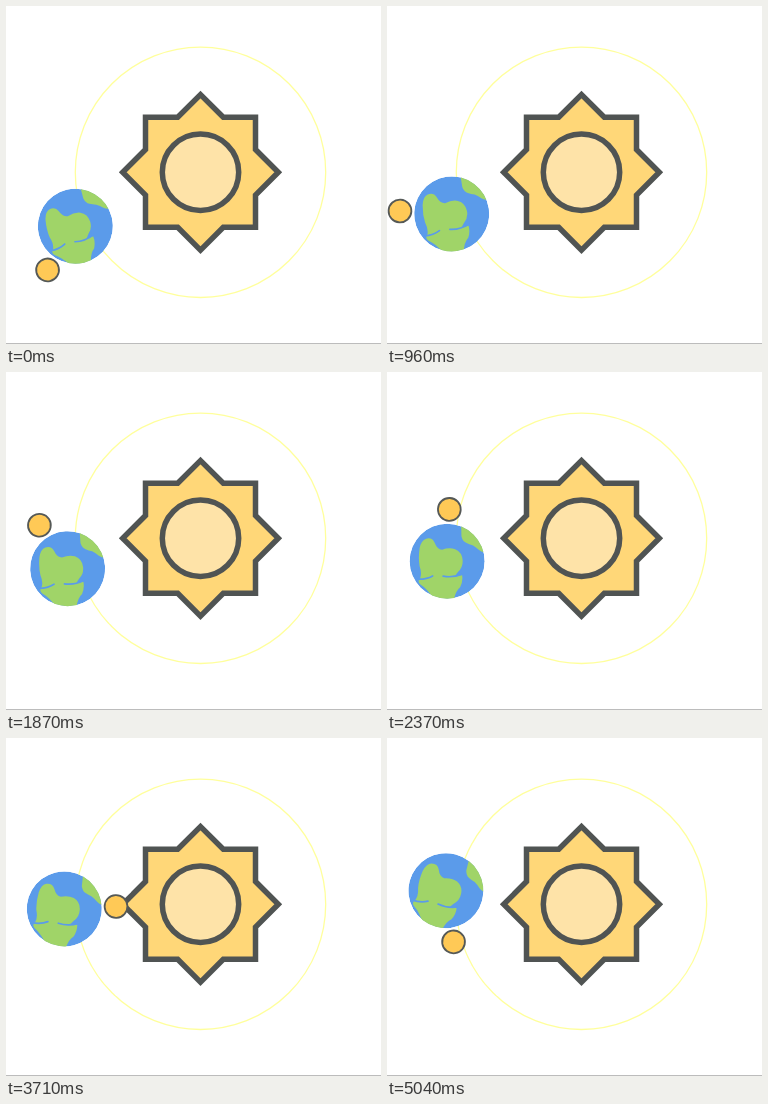
These frames come from a looping animation (375x338 px, 5100 ms). An HTML page:

```html
<!DOCTYPE html>
<html lang="en">
<head>
<meta charset="utf-8">
<title>Sun, earth and moon</title>
<style>
  html, body { margin: 0; width: 100%; height: 100%; overflow: hidden; background: #fff; }
  svg { display: block; width: 375px; height: 338px; }
  .ink { stroke: #505453; stroke-width: 5.5; }
  .sea { fill: #5b9bea; }
  .land { fill: #a0d468; }
  .river { fill: none; stroke: #5b9bea; stroke-width: 1.7; stroke-linecap: round; }
</style>
</head>
<body>
<svg viewBox="0 0 375 338">
  <defs>
    <clipPath id="globe"><circle r="37.5"/></clipPath>
  </defs>
  <rect y="337" width="375" height="1" fill="#bcbcbc"/>
  <g transform="translate(194.5 166.3)">
    <circle r="125.2" fill="none" stroke="#ffff9c" stroke-width="1.3"/>
    <path id="star" class="ink" fill="#ffd778"/>
    <circle class="ink" r="38.2" fill="#fee3a8"/>
    <g id="orbit">
      <g transform="translate(-136.3 0)">
        <g transform="rotate(9.65)" clip-path="url(#globe)">
          <circle class="sea" r="37.5"/>
          <path class="land" d="M14 -40 L14.3 -25 Q15.5 -20 19 -18.5 Q22 -17 25.5 -16 Q29 -14 31.6 -11.4 Q34 -9 40 -8.5 L40 -40Z"/>
          <path class="land" d="M-27 17 Q-25 12 -27.5 5 Q-29 -3 -27.5 -13 Q-26 -21 -21 -22.5 Q-15 -24 -12.5 -18.5 Q-10 -12 -5 -11.5 Q2 -14 8 -12 Q15 -9 15.5 -1 Q16 6 11 10.5 L8 14.5 L15 14 Q16 20 13 26 Q8 30 6.5 40 L-12 40 Q-19 28 -27 23 Q-30 20 -27 17Z"/>
          <path class="river" d="M-30 18 Q-21 18.5 -14.5 14.8"/>
          <path class="river" d="M-4 15 Q6 17 16 12.5"/>
        </g>
        <g id="moon">
          <circle cx="51.8" r="11.4" fill="#ffc956" stroke="#555957" stroke-width="1.8"/>
        </g>
      </g>
    </g>
  </g>
</svg>
<script>
  const LOOP = 5100;
  const $ = id => document.getElementById(id);

  // Eight-pointed star: two equal squares, one turned by 45 degrees.
  const half = 55, tip = half * Math.SQRT2, notch = tip / Math.cos(Math.PI / 8) * Math.cos(Math.PI / 4);
  const points = Array.from({ length: 16 }, (_, i) => {
    const r = i % 2 ? notch : tip, a = i * Math.PI / 8;
    return `${(r * Math.cos(a)).toFixed(2)} ${(r * Math.sin(a)).toFixed(2)}`;
  });
  $("star").setAttribute("d", `M${points.join("L")}Z`);

  // Hold times: each span splits into eight steps on a 10 ms grid.
  const spans = [70, 610, 1170, 1730, 2300, 2860, 3430, 3990, 4550, 5110];
  const starts = [0];
  for (let i = 0; i < spans.length - 1; i++) {
    const len = spans[i + 1] - spans[i];
    for (let k = 0; k < 8; k++) starts.push(spans[i] + Math.ceil(k * len / 80) * 10);
  }

  const turn = (id, deg) => $(id).setAttribute("transform", `rotate(${deg.toFixed(3)})`);

  function draw(now) {
    const ms = now % LOOP;
    const t = starts.findLast(s => s <= ms) / 1000;
    turn("orbit", -23.3 + 5.76 * t);
    turn("moon", 145.7 + 57.55 * t);
  }

  const begin = performance.now();
  function tick() {
    draw(performance.now() - begin);
    requestAnimationFrame(tick);
  }
  tick();
</script>
</body>
</html>
```
